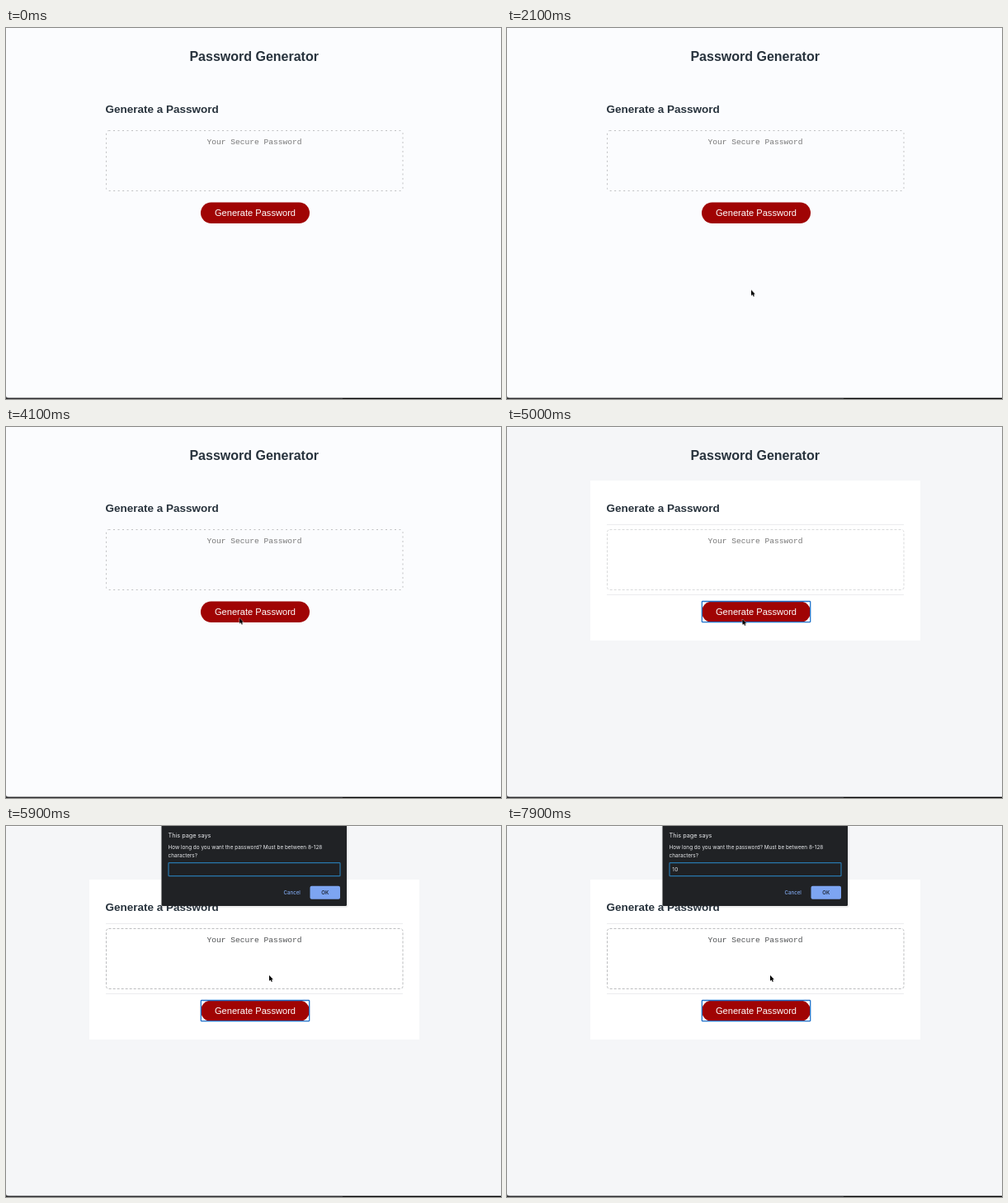
An HTML page that plays this animation: 600 px wide and 450 px high, repeating every 8 s.

```html
<!DOCTYPE html>
<html lang="en">
<head>
<meta charset="utf-8">
<title>Password Generator</title>
<style>
  html, body { margin: 0; width: 100%; height: 100%; overflow: hidden; background: #fbfcfe; }
  svg { display: block; width: 600px; height: 450px; }
  text { font-family: "Liberation Sans", Arial, sans-serif; }
  .head { font-weight: bold; fill: #28333d; }
  .mono { font: 9.6px "Liberation Mono", "Courier New", monospace; fill: #777; }
  .ui text { font-family: Inter, Roboto, sans-serif; font-size: 6.4px; fill: #e8eaed; }
  .mid { text-anchor: middle; }
  .field { fill: none; stroke: #bfc0c2; stroke-dasharray: 2 3.5; }

  /* Hard state changes */
  .card, .ui, .caret, .one, .zero, .field, .mono { animation: 8s step-end infinite; }
  .card { animation-name: card; }
  .ui { animation-name: dialog; }
  .caret { animation-name: caret; }
  .one { animation-name: one; }
  .zero { animation-name: zero; }
  .field { animation-name: field; }
  .mono { animation-name: ink; }
  @keyframes card { 0% { opacity: 0 } 61.25%, 100% { opacity: 1 } }
  @keyframes dialog { 0% { opacity: 0 } 63.75%, 100% { opacity: 1 } }
  @keyframes one { 0% { opacity: 0 } 83.75%, 100% { opacity: 1 } }
  @keyframes zero { 0% { opacity: 0 } 86.25%, 100% { opacity: 1 } }
  @keyframes field {
    0% { stroke: #bfc0c2; stroke-dasharray: 2 3.5 }
    61.25% { stroke: #d9dadb; stroke-dasharray: 3 2 }
    63.75%, 100% { stroke: #bcbdbf; stroke-dasharray: 3 2 }
  }
  @keyframes ink { 0% { fill: #777 } 63.75%, 100% { fill: #505254 } }
  @keyframes caret {
    0% { opacity: 0; transform: none }
    66.25% { opacity: 1 }
    72.5% { opacity: 0 }
    78.75% { opacity: 1; transform: none }
    83.75% { opacity: 1; transform: translateX(3.2px) }
    86.25% { opacity: 1; transform: translateX(7.4px) }
    92.5%, 100% { opacity: 0; transform: translateX(7.4px) }
  }

  /* The pointer advances ten times a second */
  .pointer { animation: move 8s infinite; }
  @keyframes move {
    0% { transform: translate(470px, 500px); animation-timing-function: step-end }
    8.75% { transform: translate(470px, 442px); animation-timing-function: steps(3) }
    12.5% { transform: translate(345px, 420px); animation-timing-function: steps(3) }
    16.25% { transform: translate(304.8px, 401.5px); animation-timing-function: steps(2) }
    18.75% { transform: translate(304px, 385px); animation-timing-function: steps(9) }
    30% { transform: translate(292px, 284px); animation-timing-function: steps(4) }
    35%, 40% { transform: translate(286.5px, 250.2px); animation-timing-function: steps(2) }
    42.5% { transform: translate(289px, 291px); animation-timing-function: steps(7) }
    51.25% { transform: translate(283px, 231.5px); animation-timing-function: steps(8) }
    61.25% { transform: translate(284.8px, 228px); animation-timing-function: steps(2) }
    63.75% { transform: translate(286px, 238px); animation-timing-function: steps(8) }
    73.75%, 100% { transform: translate(319px, 181px) }
  }
</style>
</head>
<body>
<svg viewBox="0 0 600 450">
  <rect width="600" height="450" fill="#fbfcfe"/>

  <g class="card">
    <rect y="1" width="600" height="449" fill="#f5f6f8"/>
    <rect x="101" y="65" width="400" height="194" fill="#fff"/>
    <path d="M121 118.5H481M121 203.5H481" stroke="#ebecee"/>
  </g>

  <path d="M0 446Q0 448.5 3 448.5H600V450H0Z" fill="#4a4b4d"/>
  <path d="M0 449.5H600" stroke="#2a2a2c"/>
  <path d="M408 449.5H600" stroke="#000"/>

  <text class="head mid" x="300.7" y="40" font-size="16">Password Generator</text>
  <text class="head" x="120.5" y="103" font-size="13.5">Generate a Password</text>

  <rect class="field" x="121.5" y="124.5" width="359.5" height="73" rx="3"/>
  <text class="mono mid" x="301" y="141">Your Secure Password</text>

  <rect x="236" y="211.5" width="132" height="25.5" rx="12.75" fill="#a00404"/>
  <text class="mid" x="302" y="228" font-size="11.1" fill="#fff">Generate Password</text>
  <rect class="card" x="236.3" y="211.5" width="131.4" height="25.2" rx=".8" fill="none" stroke="#2072c9" stroke-width="1.3"/>

  <g class="ui">
    <rect x="187.5" y="-3" width="227" height="102" rx="2" fill="#000" opacity=".07"/>
    <rect x="188.5" y="-3" width="224.5" height="100" rx="1.5" fill="#202225"/>
    <text x="196.5" y="13.5" style="font-size:7.3px">This page says</text>
    <text x="196.5" y="28">How long do you want the password? Must be between 8-128</text>
    <text x="196.5" y="38">characters?</text>
    <rect x="197" y="44.7" width="208" height="16" rx=".8" fill="#1f2124" stroke="#2877ad" stroke-width="1.2"/>
    <text class="one" x="200.3" y="55">1</text>
    <text class="zero" x="203.3" y="55">0</text>
    <path class="caret" d="M200.5 49V57" stroke="#e8eaed" stroke-width=".7"/>
    <text class="mid" x="346.7" y="82.7" style="font-size:6.1px;font-weight:500;fill:#7fa7ec">Cancel</text>
    <rect x="368.5" y="72.7" width="36.5" height="16" rx="2" fill="#7da5f2"/>
    <text class="mid" x="386.7" y="82.7" style="font-size:6.1px;font-weight:600;fill:#202a3c">OK</text>
  </g>

  <path class="pointer" d="M0 0V7L1.6 5.6L2.7 8.1L3.9 7.6L2.9 5.2H4.9Z" fill="#000" stroke="#fff" stroke-width=".7" paint-order="stroke"/>
</svg>
</body>
</html>
```
